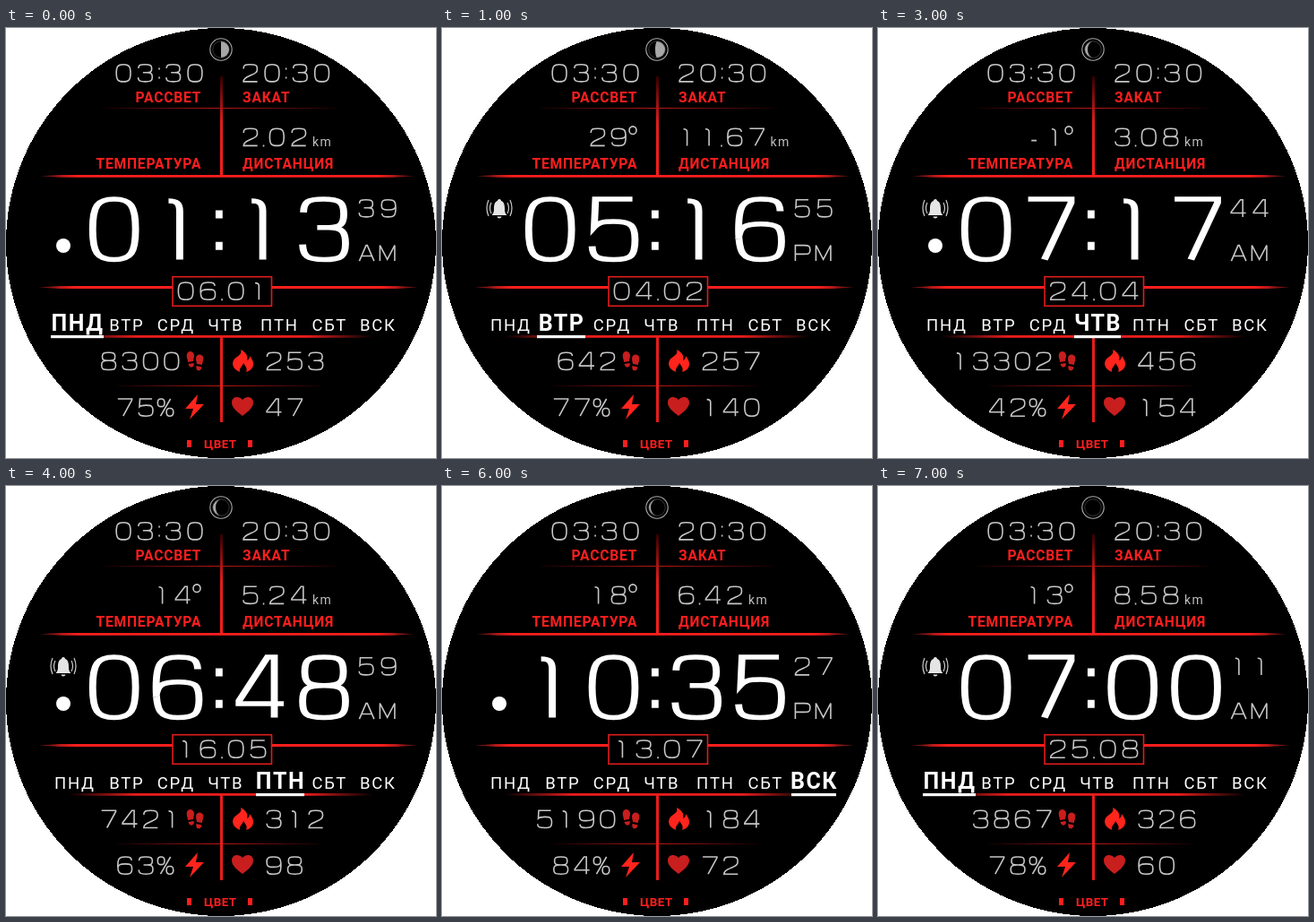
Write an HTML page that moves like this. It is 480x480 px and loops after 8000 ms.

```html
<!DOCTYPE html>
<html lang="ru">
<meta charset="utf-8">
<title>Циферблат</title>
<style>
html, body { margin: 0; width: 100%; height: 100%; overflow: hidden; background: #fff }
svg { display: block; width: 100vw; height: 100vh }
text { font-family: Roboto, sans-serif }
.label { font-weight: 700; font-size: 15.6px; letter-spacing: .8px; fill: #ff1e1e }
.day { font-size: 18.5px; letter-spacing: 1.7px; text-anchor: middle; fill: #fff }
.today { font-size: 25px; font-weight: 700; letter-spacing: 1.5px }
.end { text-anchor: end }
.thin { fill: none; stroke: #c6c6c6; stroke-width: 1.6 }
.big { fill: none; stroke: #fff; stroke-width: 5.6 }
</style>
<svg viewBox="0 0 480 480">
  <defs>
    <linearGradient id="fade">
      <stop offset="0" stop-color="#501010"/><stop offset=".1" stop-color="#ff1e1e"/>
      <stop offset=".9" stop-color="#ff1e1e"/><stop offset="1" stop-color="#501010"/>
    </linearGradient>
    <linearGradient id="soft">
      <stop offset="0" stop-color="#000"/><stop offset=".22" stop-color="#e81c1c"/>
      <stop offset=".78" stop-color="#e81c1c"/><stop offset="1" stop-color="#000"/>
    </linearGradient>
    <linearGradient id="dim">
      <stop offset="0" stop-color="#100"/><stop offset=".5" stop-color="#c01818"/><stop offset="1" stop-color="#100"/>
    </linearGradient>
    <linearGradient id="drop" x2="0" y2="1">
      <stop offset="0" stop-color="#300"/><stop offset=".45" stop-color="#e01c1c"/><stop offset="1" stop-color="#ff1e1e"/>
    </linearGradient>
  </defs>
  <circle cx="240" cy="240" r="240" shape-rendering="crispEdges"/>
  <g fill="url(#dim)">
    <rect x="110" y="89" width="260" height="1"/>
    <rect x="124" y="399" width="228" height="1"/>
  </g>
  <rect x="239" y="54" width="3" height="112" fill="url(#drop)"/>
  <rect x="239" y="345" width="3" height="95" fill="#e81c1c"/>
  <g fill="url(#fade)">
    <path d="M38 165.3L62 164H432L456 165.3L432 166.7H62Z"/>
    <path d="M36 289.5L60 288.1H436L460 289.5L436 290.9H60Z"/>
  </g>
  <rect x="70" y="343" width="340" height="2.8" fill="url(#soft)"/>
  <rect x="186" y="277.7" width="110.5" height="32.6" stroke="#e01c1c" stroke-width="1.6"/>
  <g class="label">
    <text class="end" x="218.2" y="83">РАССВЕТ</text><text x="264" y="83">ЗАКАТ</text>
    <text class="end" x="218.2" y="157">ТЕМПЕРАТУРА</text><text x="264" y="157">ДИСТАНЦИЯ</text>
    <text x="221" y="469" style="font-size:13.5px;letter-spacing:.4px">ЦВЕТ</text>
    <path d="M202 460h5v8h-5zM270 460h5v8h-5z"/>
  </g>
  <g fill="#c81e1e">
    <path d="M202 364C203 360 209 360 210 365C210 369 209 370 209 372L203 373C203 369 201 368 202 364ZM203.500 375L209.500 374C211 379 205 381 203.500 375Z"/>
    <path d="M212 369C212 364 218 363 220 367C221 371 219 373 219 376L213 375C213 373 212 372 212 369ZM212.500 377L218.500 378.500C218 384 211 384 212.500 377Z"/>
    <path d="M264 433C258 428 252 424 252 418C252 411 260 410 264 415C268 410 276 411 276 418C276 424 270 428 264 433Z"/>
  </g>
  <g fill="#ff241c">
    <path d="M214 409L200 425H209L205 437L221 420H212Z"/>
    <path d="M262 359C270 363 270 368 269 371C272 370 272 367 272 366C278 373 278 381 268 384C270 380 267 377 265 374C264 378 260 379 261 384C251 380 251 371 258 367C262 364 263 363 262 359Z"/>
  </g>
  <g id="live"></g>
</svg>
<script>
// Glyph strokes in a 100 x 100 box
const SIX = 'M97 20C96 4 86 0 52 0C10 0 0 10 0 50C0 90 10 100 50 100C90 100 100 94 100 70C100 46 92 41 52 41C14 41 2 46 0 66';
const GLYPHS = {
  0: 'M50 0C89 0 100 11 100 50C100 89 89 100 50 100C11 100 0 89 0 50C0 11 11 0 50 0Z',
  1: 'M29 3C48 3 55 7 55 20L55 100',
  2: 'M2 25C2 5 10 0 50 0C90 0 99 5 99 27C99 45 87 51 57 62C25 74 2 80 2 100L100 100',
  3: 'M2 22C3 4 12 0 48 0C88 0 96 6 96 24C96 42 88 47 60 47L34 47M60 47C92 47 100 54 100 73C100 95 90 100 50 100C10 100 1 94 0 75',
  4: 'M104 77L0 77L0 72L66 0L82 0L82 100',
  5: 'M94 0L8 0L5 46C14 39 25 37 50 37C92 37 100 44 100 67C100 94 92 100 50 100C10 100 1 95 0 78',
  6: SIX,
  7: 'M0 0L100 0L100 6L38 100',
  8: 'M50 0C88 0 95 5 95 24C95 42 88 47 50 47C12 47 5 42 5 24C5 5 12 0 50 0ZM50 47C92 47 100 53 100 73C100 95 92 100 50 100C8 100 0 95 0 73C0 53 8 47 50 47Z',
  9: SIX.replace(/\d+/g, n => 100 - n),
  A: 'M0 100L46 0L54 0L100 100M16 68L84 68',
  M: 'M0 100L0 0L50 90L100 0L100 100',
  P: 'M0 100L0 0L62 0C92 0 100 6 100 28C100 52 92 56 62 56L0 56',
  '%': 'M82 0L18 100M22 0C38 0 44 5 44 22C44 40 38 45 22 45C6 45 0 40 0 22C0 5 6 0 22 0ZM78 55C94 55 100 60 100 78C100 95 94 100 78 100C62 100 56 95 56 78C56 60 62 55 78 55Z',
  '-': 'M34 70L70 70'
};
const glyph = (ch, x, y, w, h) => GLYPHS[ch].replace(/(\d+) (\d+)/g,
  (_, px, py) => `${(x + px * w / 100).toFixed(2)} ${(y + py * h / 100).toFixed(2)}`);

function line(str, x, y, { w = 15.8, h = 19.2, adv = 23.4, gap = 5, dot = 2, cls = 'thin' } = {}) {
  let d = '';
  for (const ch of str) {
    if (ch === '.' || ch === ':') {
      const cx = x + (gap - adv + w) / 2;
      for (const f of ch === '.' ? [1] : [.25, .775]) d += `M${cx} ${y + h * f - dot / 2}v${dot}`;
      x += gap;
    } else {
      d += glyph(ch, x, y, w, h);
      x += adv;
    }
  }
  return `<path class="${cls}" d="${d}"/>`;
}

const DAYS = ['ПНД', 'ВТР', 'СРД', 'ЧТВ', 'ПТН', 'СБТ', 'ВСК'];
const DAY_X = [76, 134, 189, 244.5, 304.5, 360.5, 414.5];
const TODAY = [[79.5, 59], [133, 54], [191, 56], [245, 52], [306, 54], [362, 50], [415, 50]];

// moon: [lit on the right, terminator bulge]; icons: a = alarm, l = wireless link
const STATES = [
  { time: '01:13', sec: '39', half: 'AM', date: '06.01', temp: '', km: '2.02', steps: '8300', kcal: '253', power: '75', pulse: '47', moon: [1, 0], icons: 'l' },
  { time: '05:16', sec: '55', half: 'PM', date: '04.02', temp: '29', km: '11.67', steps: '642', kcal: '257', power: '77', pulse: '140', moon: [1, 2], icons: 'a' },
  { time: '03:03', sec: '11', half: 'AM', date: '19.03', temp: '22', km: '8.87', steps: '9260', kcal: '190', power: '51', pulse: '167', moon: [0, 3], icons: 'al' },
  { time: '07:17', sec: '44', half: 'AM', date: '24.04', temp: '-1', km: '3.08', steps: '13302', kcal: '456', power: '42', pulse: '154', moon: [0, -6], icons: 'al' },
  { time: '06:48', sec: '59', half: 'AM', date: '16.05', temp: '14', km: '5.24', steps: '7421', kcal: '312', power: '63', pulse: '98', moon: [0, -6], icons: 'al' },
  { time: '08:27', sec: '19', half: 'AM', date: '21.06', temp: '-6', km: '3.51', steps: '10809', kcal: '28', power: '56', pulse: '167', moon: [0, -4], icons: 'al' },
  { time: '10:35', sec: '27', half: 'PM', date: '13.07', temp: '18', km: '6.42', steps: '5190', kcal: '184', power: '84', pulse: '72', moon: [0, -7], icons: 'l' },
  { time: '07:00', sec: '11', half: 'AM', date: '25.08', temp: '13', km: '8.58', steps: '3867', kcal: '326', power: '78', pulse: '60', moon: [0, -9], icons: 'a' }
];

const moon = ([right, bulge]) => `<circle cx="240" cy="24" r="12.2" stroke="#aaa" stroke-width="1.1"/>
  <circle cx="240" cy="24" r="9.3" stroke="#444" stroke-width=".8"/>
  <path fill="#a8a8a8" d="M240 15A9 9 0 0 ${right} 240 33A${Math.abs(bulge)} 9 0 0 ${bulge < 0 ? 1 - right : right} 240 15Z"/>`;

const ALARM = `<path fill="#e4e4e4" d="M64 191C65.500 191 66 192 66 193C69.500 194 70 198 70 202C70 206 71 207 72.500 209H55.500C57 207 58 206 58 202C58 198 58.500 194 62 193C62 192 62.500 191 64 191ZM61.500 210.500H66.500C66 213 62 213 61.500 210.500Z"/>
  <path fill="none" stroke="#ccc" stroke-width="1.2" d="M55 195Q52 201 55 207M52 192Q48 201 52 210M73 195Q76 201 73 207M76 192Q80 201 76 210"/>`;
const LINK = '<circle cx="64" cy="243" r="8" fill="#fff"/>';

function day(name, i, today) {
  if (i !== today) return `<text class="day" x="${DAY_X[i] + .8}" y="337.7">${name}</text>`;
  const [x, w] = TODAY[i];
  return `<text class="day today" x="${x + .5}" y="337.5">${name}</text>
    <rect x="${x - w / 2}" y="343" width="${w}" height="3.2" fill="#fff"/>`;
}

function face(s, today) {
  const sun = { adv: 24.3, gap: 7 }, kmX = 264.3 + 24.5 * (s.km.length - 1) + 5;
  return moon(s.moon)
    + line('03:30', 123.2, 40.7, sun) + line('20:30', 264.8, 40.7, sun)
    + line(s.temp, 165.9, 112.2)
    + (s.temp && '<ellipse class="thin" cx="213" cy="114.200" rx="4" ry="4.300"/>')
    + line(s.km, 264.9, 112.2, { adv: 24.5 })
    + `<text x="${kmX - .8}" y="132" font-size="14" letter-spacing="1.500" fill="#c0c0c0">km</text>`
    + (s.icons.includes('a') ? ALARM : '') + (s.icons.includes('l') ? LINK : '')
    + `<g transform="scale(1.4 1)">${line(s.time, 69.1, 191, { w: 34.2, h: 67.5, adv: 50.6, gap: 15.6, dot: 9, cls: 'big' })}</g>`
    + line(s.sec, 394.2, 191.7, { adv: 25 }) + line(s.half, 394.4, 242.6, { h: 17.5, w: 16.5, adv: 23 })
    + line(s.date, 192.4, 284, { w: 16.4, adv: 24.8, gap: 6.5 })
    + DAYS.map((name, i) => day(name, i, today)).join('')
    + line(s.steps, 176.9 - 23.4 * (s.steps.length - 1), 362.3) + line(s.kcal, 291.1, 362.3)
    + line(s.power, 124.8, 414) + line('%', 169.3, 414, { w: 17.5 }) + line(s.pulse, 291.1, 414);
}

const live = document.getElementById('live');
let shown = -1;
function tick(now) {
  const i = Math.floor(now / 1000) % STATES.length;
  if (i !== shown) live.innerHTML = face(STATES[shown = i], i % 7);
  requestAnimationFrame(tick);
}
tick(performance.now());
</script>
</html>
```
